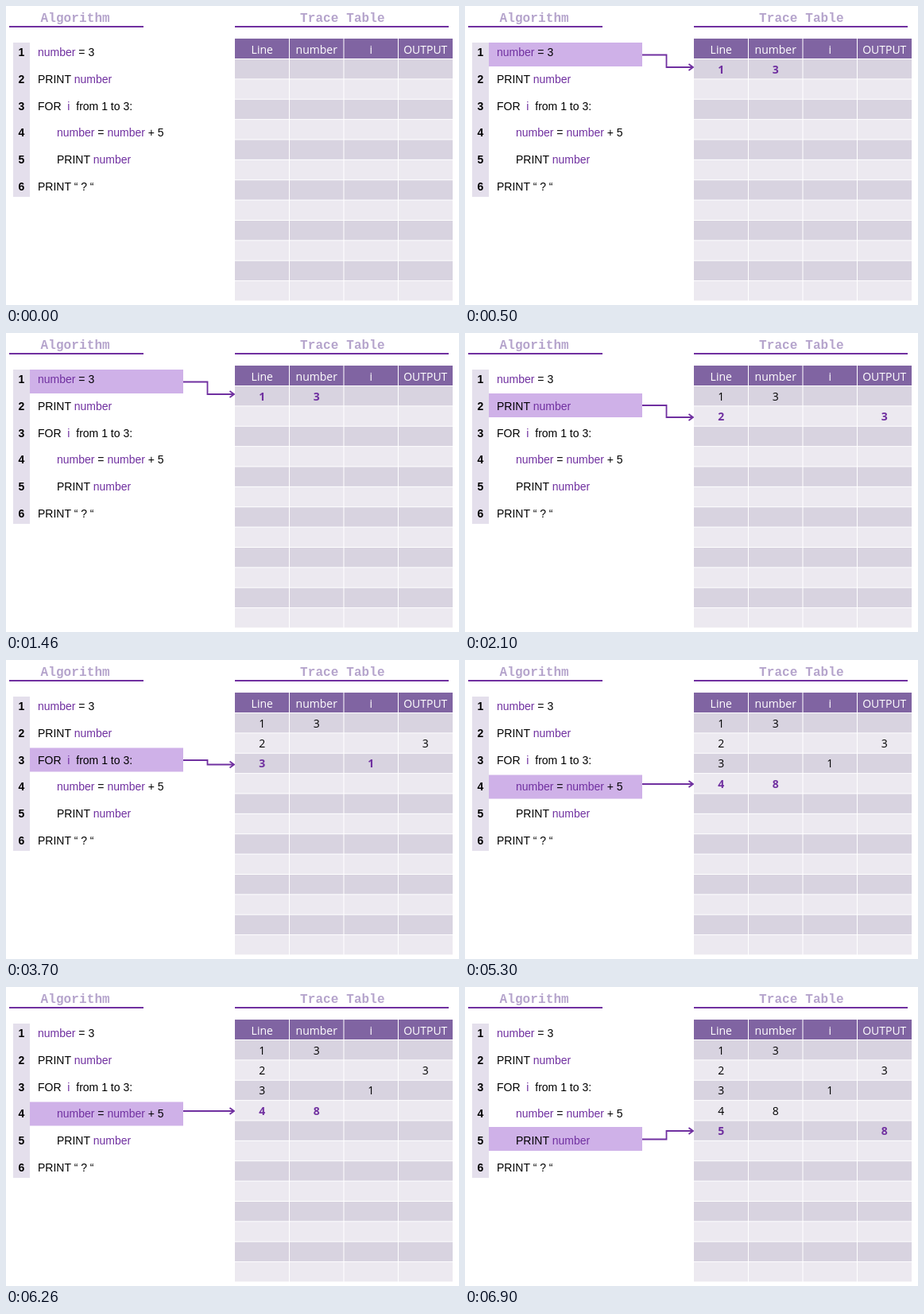
These frames come from a looping animation (570 by 376 pixels, 8000 ms). An HTML page:

```html
<!DOCTYPE html>
<html>
<head>
<meta charset="utf-8">
<style>
html, body { margin: 0; width: 100%; height: 100%; overflow: hidden; background: #fff; }
svg { display: block; }
text { white-space: pre; }
.title { font: bold 16px "Liberation Mono", monospace; letter-spacing: .1px; fill: #b5a4cc; }
.code { font: 14px "Liberation Sans", Arial, sans-serif; }
.num { font-weight: bold; text-anchor: middle; }
.var { fill: #7030a0; }
.cell { font: 14px "Open Sans", "Noto Sans", sans-serif; text-anchor: middle; }
.head { fill: #fff; }
.now { fill: #7030a0; font-weight: bold; }
.line { fill: none; stroke: #7030a0; stroke-width: 1.8; }
</style>
</head>
<body>
<svg id="stage" width="570" height="376" viewBox="0 0 570 376"></svg>
<script>
const LOOP = 8000, FIRST = 500, STEP = 1600;
const ROW = 25.37, TOP = 67;
const edges = [288, 356.5, 425, 493.5, 562];
const heads = ['Line', 'number', 'i', 'OUTPUT'];
// Variables are wrapped in underscores
const program = [
  [40, '_number_ = 3'],
  [40, 'PRINT _number_'],
  [40, 'FOR  _i_  from 1 to 3:'],
  [64, '_number_ = _number_ + 5'],
  [64, 'PRINT _number_'],
  [40, 'PRINT “ ? “'],
];
// Each step: column and value written, top of the highlight, start and end of the arrow
const steps = [
  { col: 1, value: 3, bar: 46, from: 61.5, to: 77 },
  { col: 3, value: 3, bar: 76, from: 91, to: 106 },
  { col: 2, value: 1, bar: 110.5, from: 126, to: 131.5 },
  { col: 1, value: 8, bar: 144.5, from: 156, to: 156 },
  { col: 3, value: 8, bar: 176, from: 191.5, to: 181 },
];

const rect = (x, y, w, h, fill) =>
  `<rect x="${x}" y="${y}" width="${w}" height="${h}" fill="${fill}"/>`;
const text = (x, y, cls, s) => `<text x="${x}" y="${y}" class="${cls}">${s}</text>`;
const path = d => `<path class="line" d="${d}"/>`;
const cell = (col, y, cls, s) =>
  text((edges[col] + edges[col + 1]) / 2, y, 'cell ' + cls, s);

function listing() {
  return program.map(([x, s], i) => {
    const y = 63 + i * 33.8;
    const marked = s.replace(/_(\w+?)_/g, '<tspan class="var">$1</tspan>');
    return text(19.5, y, 'code num', i + 1) + text(x, y, 'code', marked);
  }).join('');
}

function table() {
  let out = rect(288, 41, 274, 25, '#8064a2');
  for (let r = 0; r < 12; r++)
    out += rect(288, TOP + r * ROW, 274, ROW - 1, r % 2 ? '#ece9f0' : '#d8d3e0');
  for (const x of edges.slice(1, 4)) out += rect(x - .5, 41, 1, 331, '#fff');
  return out + heads.map((s, i) => cell(i, 60, 'head', s)).join('');
}

function draw(count) {
  let out = rect(9, 46, 21, 194, '#e4dfec');
  const now = steps[count - 1];
  if (now) {
    const { bar, from, to } = now;
    out += rect(30, bar, 193, 30, '#cfb1e8');
    out += path(`M223 ${from}H253.5V${to}H287M281.5 ${to - 4}L287 ${to}L281.5 ${to + 4}`);
  }
  out += text(43.5, 20, 'title', 'Algorithm') + text(370, 20, 'title', 'Trace Table');
  out += path('M4 26H173M288 26H557') + listing() + table();
  steps.slice(0, count).forEach(({ col, value }, i) => {
    const y = 84.5 + i * ROW, cls = i === count - 1 ? 'now' : '';
    out += cell(0, y, cls, i + 1) + cell(col, y, cls, value);
  });
  stage.innerHTML = out;
}

const stage = document.getElementById('stage');
const start = performance.now();
let shown = -1;
function tick() {
  const t = (performance.now() - start) % LOOP;
  const count = Math.floor((t - FIRST) / STEP) + 1;
  if (count !== shown) draw(shown = count);
  requestAnimationFrame(tick);
}
tick();
</script>
</body>
</html>
```
